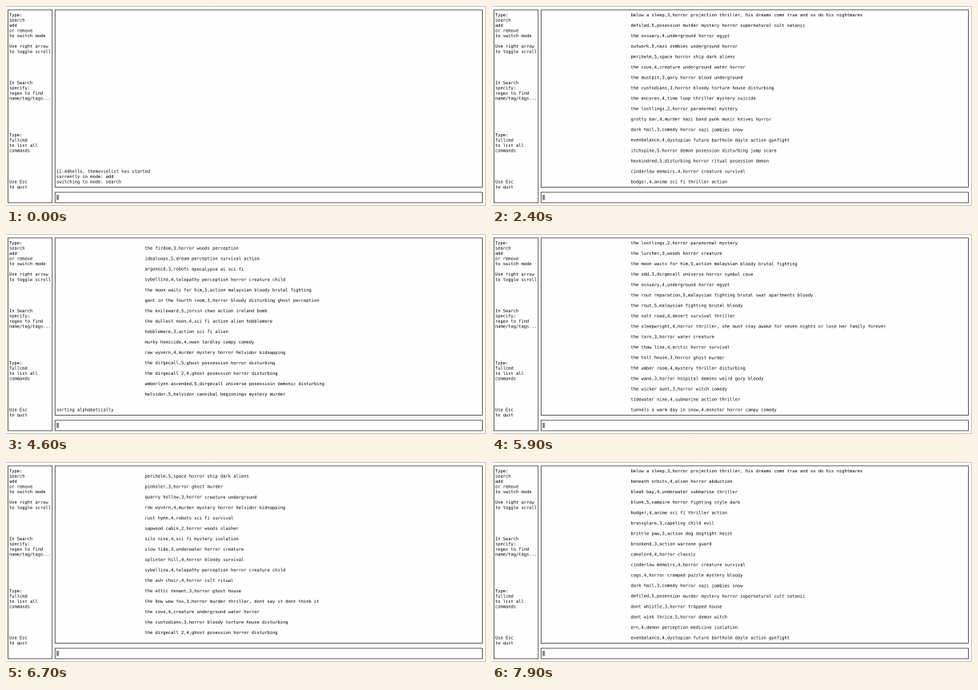
An HTML page that plays this animation: 600 by 250 pixels, repeating every 8000 ms.

```html
<!DOCTYPE html>
<html lang="en">
<head>
<meta charset="utf-8">
<title>Movie list in the terminal</title>
<style>
  html, body { margin: 0; width: 100%; height: 100%; overflow: hidden; background: #fefefe; }
  svg { display: block; width: 600px; height: 250px; }
  text {
    font: 5.41px "DejaVu Sans Mono", monospace;
    fill: #000;
    text-rendering: geometricPrecision;
    white-space: pre;
    /* an invisible tilt keeps baselines from snapping to whole pixels */
    transform-box: fill-box;
    transform-origin: center;
    transform: rotate(0.03deg);
  }
  .frame { fill: none; stroke: #333; stroke-width: 0.8; }
  .edge { fill: none; stroke: #c4c4c4; stroke-width: 1; }
  .cursor { fill: #8a8a8a; }
</style>
</head>
<body>
<svg id="stage" viewBox="0 0 600 250">
  <path class="edge" d="M0 .5H599.5V249.5H0"/>
  <rect class="frame" x="2.4" y="4.9" width="55.4" height="241"/>
  <rect class="frame" x="61.3" y="4.9" width="534.1" height="221.5"/>
  <rect class="frame" x="61.3" y="232.9" width="534.1" height="13"/>
  <rect class="cursor" x="63" y="236" width="3.2" height="6.5"/>
</svg>
<script>
const LOOP = 8000;
const ROWS = 33;
const LAST_ROW = 30;        // row of the final entry when not scrolled
const ROWS_PER_PRESS = 5;
const KEY_REPEAT = 1000 / 12;
const LEFT = { help: 4, log: 63, list: 173.5 };

const help = {
  0: 'Type:', 1: 'search', 2: 'add', 3: 'or remove', 4: 'to switch mode',
  6: 'Use right arrow', 7: 'to toggle scroll',
  13: 'In Search', 14: 'specify:', 15: 'regex to find', 16: 'name/tag/tags...',
  23: 'Type:', 24: 'fullcmd', 25: 'to list all', 26: 'commands',
  32: 'Use Esc', 33: 'to quit'
};

const greeting = {
  30: '11:44hello, themovielist has started',
  31: 'currently in mode: add',
  32: 'switching to mode: search'
};

const movies = `
beneath orbits,4,alien horror abduction
blunk,5,vampire horror fighting style dark
brassglare,3,capeling child evil
cakelord,4,horror classic
fallow creek,3,horror woods cult
fever lodge,4,thriller isolation snow
gaslamp county,3,murder mystery
hayfright,5,horror classic
jared q,2,horror space slasher
quarry hollow,3,horror creature underground
rust hymn,4,robots sci fi survival
sapwood cabin,2,horror woods slasher
silo nine,4,sci fi mystery isolation
slow tide,3,underwater horror creature
splinter hill,4,horror bloody survival
the ash choir,4,horror cult ritual
the attic tenant,3,horror ghost house
the lurcher,3,woods horror creature
the odd,3,dirgecall universe horror symbol cave
the rout reparation,5,malaysian fighting brutal swat apartments bloody
the rout,5,malaysian fighting brutal bloody
the salt road,4,desert survival thriller
the sleepwright,4,horror thriller, she must stay awake for seven nights or lose her family forever
the tarn,3,horror water creature
the thaw line,4,arctic horror survival
the toll house,3,horror ghost murder
the umber room,4,mystery thriller disturbing
the wicker aunt,3,horror witch comedy
tidewater nine,4,submarine action thriller
undertow lane,3,murder mystery kidnapping
whisper mill,4,horror ghost paranormal
zephyr station,4,space horror isolation
moru,5,sleepdemon horror disturbing
dont whistle,3,horror trapped house
cogs,4,horror cramped puzzle mystery bloody
ern,4,demon perception medicine isolation
ogling,4,horror demon perception
grim conferences,4,paranormal horror ghosts asylum
the wane,3,horror hospital demons weird gory bloody
40 hours of dusk,4,vampire arctic fighting survival
inzero,5,alien action space horror survival
brookend,3,action warzone guard
brittle paw,3,action dog dogfight heist
fissuring,4,mystery disturbing thriller horror
dont wink thrice,5,horror demon witch
the bow wow fox,3,horror murder thriller, dont say it dont think it
valentra,4,horror posession demon spanish disturbing
pinholer,3,horror ghost murder
lurkminded,3,horror ghost hunter brutal murder
below a sleep,3,horror projection thriller, his dreams come true and so do his nightmares
defiled,5,posession murder mystery horror supernatural cult satanic
the ossuary,4,underground horror egypt
outwork,5,nazi zombies underground horror
perihelm,5,space horror ship dark aliens
the cove,4,creature underground water horror
the dustpit,3,gory horror blood underground
the custodians,3,horror bloody torture house disturbing
the encores,4,time loop thriller mystery suicide
the lostlings,2,horror paranormal mystery
grotty bar,4,murder nazi band punk music knives horror
dark hail,3,comedy horror nazi zombies snow
evenbalance,4,dystopian future bartholm dayle action gunfight
itchspine,5,horror demon posession disturbing jump scare
hexkindred,5,disturbing horror ritual posession demon
cinderlow memoirs,4,horror creature survival
bodge!,4,anime sci fi thriller action
tunnels a warm day in snow,4,monster horror campy comedy
a debt from haven,4,thriller mistrust robbery murder mystery
bleak bay,4,underwater submarine thriller
orrinton was taken,4,action
the firdom,3,horror woods perception
idealoops,5,dream perception survival action
argonoid,3,robots apocalypse ai sci fi
sybellina,4,telepathy perception horror creature child
the moon waits for him,5,action malaysian bloody brutal fighting
gent in the fourth room,3,horror bloody disturbing ghost perception
the exileward,5,jorvin chao action ireland bomb
the dullest noon,4,sci fi action alien hobblemere
hobblemere,3,action sci fi alien
murky homicide,4,owen tardley campy comedy
raw wyvern,4,murder mystery horror helvidor kidnapping
the dirgecall,5,ghost possession horror disturbing
the dirgecall 2,4,ghost posession horror disturbing
amberlynn ascended,5,dirgecall universe posessioin demonic disturbing
helvidor,5,helvidor cannibal beginnings mystery murder`.trim().split('\n');
const sorted = [...movies].sort();

const stage = document.getElementById('stage');

function addText(x, row, content = '') {
  const node = document.createElementNS('http://www.w3.org/2000/svg', 'text');
  node.setAttribute('x', x);
  node.setAttribute('y', (13.05 + row * 6.515).toFixed(2));
  node.textContent = content;
  stage.append(node);
  return node;
}

for (const row in help) addText(LEFT.help, row, help[row]);
const column = x => Array.from({ length: ROWS }, (_, row) => addText(x, row));
const logRows = column(LEFT.log);
const listRows = column(LEFT.list);

// A held arrow key: one press, a pause, then steady repeats.
function presses(elapsed, phase) {
  if (elapsed < 400) return 0;
  if (elapsed < 900) return 1;
  return 2 + Math.floor((elapsed - 900) / KEY_REPEAT + phase);
}

function viewAt(t) {
  const scrolled = (list, count) => ({ list, shift: count * ROWS_PER_PRESS, log: {} });
  if (t < 1000) return { list: [], shift: 0, log: greeting };
  if (t < 3200) return scrolled(movies, presses(Math.min(t - 1000, 1800), 0.3));
  if (t < 3600) return scrolled(movies, 14);
  if (t < 4600) return scrolled(movies, 0);
  if (t < 5000) return { list: movies, shift: -1, log: { 32: 'sorting alphabetically' } };
  return scrolled(sorted, presses(t - 5000, 0.1));
}

function show(node, content) {
  if (node.textContent !== content) node.textContent = content;
}

function draw(now) {
  const t = Math.floor((now % LOOP) / 100) * 100;
  const { list, shift, log } = viewAt(t);
  for (let row = 0; row < ROWS; row++) {
    const index = list.length - 1 - (LAST_ROW + shift - row) / 2;
    show(listRows[row], list[index] || '');
    show(logRows[row], log[row] || '');
  }
}

const start = performance.now();
function tick() {
  draw(performance.now() - start);
  requestAnimationFrame(tick);
}
tick();
</script>
</body>
</html>
```
